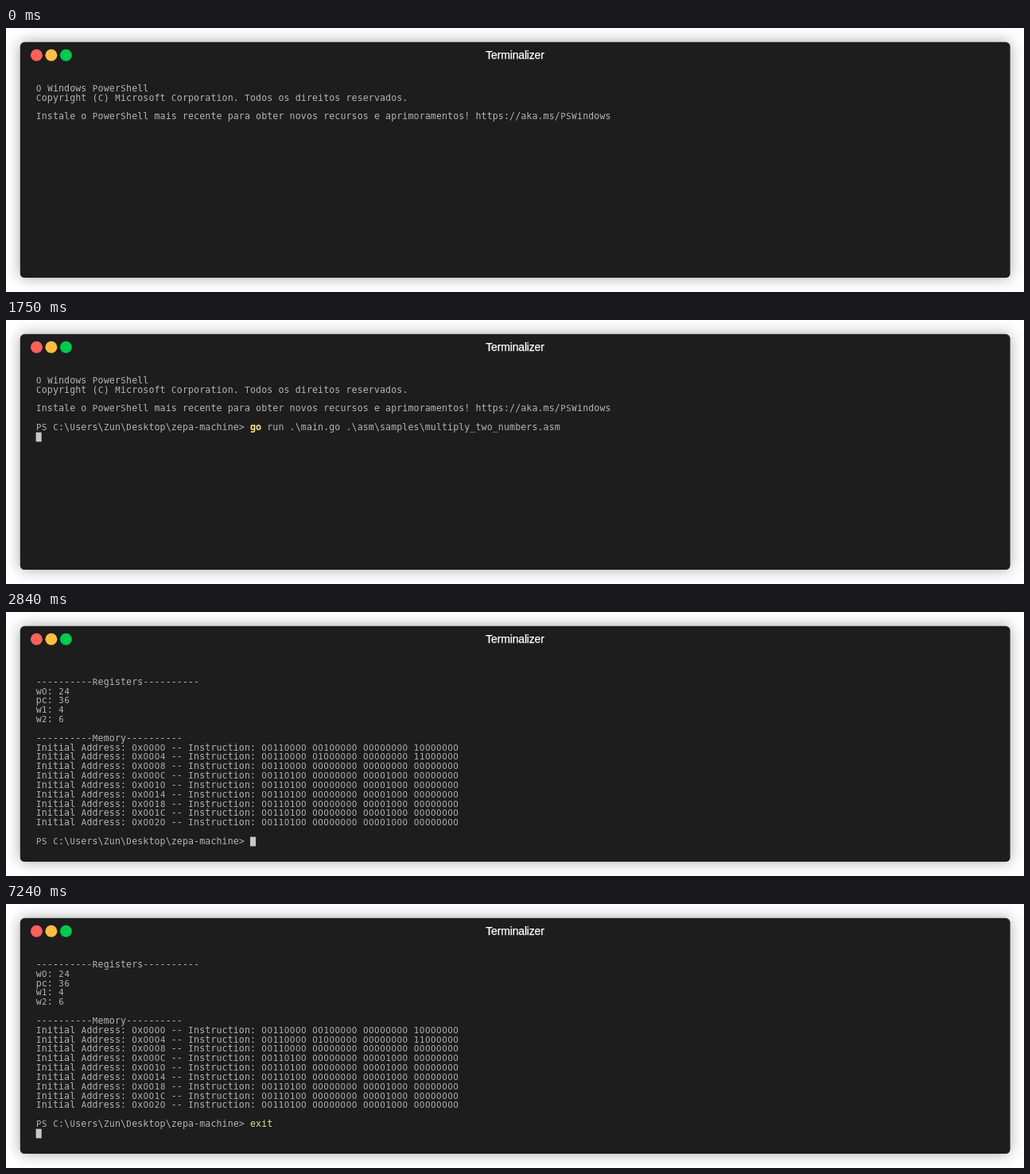
Recreate the animation shown at these times as an HTML page with a canvas. Size 1280x333 px, loop 7.98 s.

```html
<!DOCTYPE html>
<html lang="pt">
<head>
<meta charset="utf-8">
<title>Terminalizer</title>
<style>
  html, body { margin: 0; width: 100%; height: 100%; overflow: hidden; background: #fff; }
  svg, canvas { position: absolute; left: 0; top: 0; }
  .window { fill: #1d1d1d; filter: drop-shadow(0 0 9px rgba(0, 0, 0, .34)); }
  .title {
    font-family: "Liberation Sans", Arial, sans-serif; font-size: 14px; letter-spacing: -.17px;
    text-anchor: middle; fill: #fff; stroke: #fff; stroke-width: .25px;
  }
</style>
</head>
<body>
<svg width="1280" height="333">
  <rect class="window" x="17.8" y="17.8" width="1244.8" height="297.2" rx="5.5"/>
  <circle cx="38.4" cy="34.2" r="7.5" fill="#ff605c"/>
  <circle cx="56.9" cy="34.2" r="7.5" fill="#ffbd44"/>
  <circle cx="75.4" cy="34.2" r="7.5" fill="#00ca4e"/>
  <text class="title" x="640" y="39">Terminalizer</text>
</svg>
<canvas width="1280" height="333"></canvas>
<script>
const LOOP = 7980;
const CELL = { x: 37.6, y: 70.7, w: 7.088, h: 11.83 };
const TEXT = '#b4b4b4', CURSOR = '#c7c7c7', GOLD = '#f8e886', LIME = '#dde57f';
const PROMPT = 'PS C:\\Users\\Zun\\Desktop\\zepa-machine> ';
const RUN = PROMPT + 'go run .\\main.go .\\asm\\samples\\multiply_two_numbers.asm';
const RECORD = PROMPT + 'terminalizer record multiply_two_numbers';

const banner = [
  'O Windows PowerShell',
  'Copyright (C) Microsoft Corporation. Todos os direitos reservados.',
  '',
  'Instale o PowerShell mais recente para obter novos recursos e aprimoramentos! https://aka.ms/PSWindows',
  ''
];

const program = [
  '00110000 00100000 00000000 10000000',
  '00110000 01000000 00000000 11000000',
  '00110000 00000000 00000000 00000000',
  ...Array(6).fill('00110100 00000000 00001000 00000000')
];
const dashes = '-'.repeat(10);
const heading = name => dashes + name + dashes;
const address = i => '0x' + (i * 4).toString(16).toUpperCase().padStart(4, '0');
const report = [
  heading('Registers'), 'w0: 24', 'pc: 36', 'w1: 4', 'w2: 6', '',
  heading('Memory'),
  ...program.map((bits, i) => `Initial Address: ${address(i)} -- Instruction: ${bits}`)
];

// The cursor sits at the end of the last row.
const step = (at, rows, color = GOLD, bold = true) => ({ at, rows, color, bold });
const typed = (at, word) => step(at, ['', ...report, '', PROMPT + word], LIME);
const steps = [
  step(0, banner),
  step(150, [...banner, PROMPT]),
  step(700, [...banner, RECORD]),
  step(920, [...banner, RUN]),
  step(1750, [...banner, RUN, '']),
  step(2710, [RUN, '', ...report, ''], GOLD, false),
  step(2810, ['', ...report, '', '']),
  typed(2840, ''),
  typed(4840, 'e'),
  typed(4920, 'ex'),
  typed(5140, 'exi'),
  typed(5380, 'exit'),
  step(7240, [...report, '', PROMPT + 'exit', ''], LIME, false)
];

const ctx = document.querySelector('canvas').getContext('2d');
ctx.textAlign = 'center';

// Short capitals and an open zero.
function fontFor(char, bold) {
  if (bold) return '700 11.6px "Noto Sans Mono", monospace';
  if (char === '0') return '10.4px "DejaVu Sans", sans-serif';
  const size = /[A-Z1-9]/.test(char) ? 10.6 : 11.6;
  return `${size}px "DejaVu Sans Mono", monospace`;
}

function drawRow(text, row, { color, bold }) {
  const baseline = Math.round(CELL.y + row * CELL.h + 9.3);
  const isCommand = text.startsWith(PROMPT);
  const wordEnd = isCommand ? PROMPT.length + text.slice(PROMPT.length).split(' ')[0].length : 0;
  [...text].forEach((char, col) => {
    if (char === ' ') return;
    const inWord = isCommand && col >= PROMPT.length && col < wordEnd;
    ctx.font = fontFor(char, inWord && bold);
    ctx.fillStyle = inWord ? color : TEXT;
    ctx.fillText(char, CELL.x + (col + .5) * CELL.w, baseline);
  });
}

function draw(current) {
  const { rows } = current;
  ctx.clearRect(0, 0, 1280, 333);
  rows.forEach((text, row) => drawRow(text, row, current));
  if (current === steps[0]) return;
  const row = rows.length - 1;
  ctx.fillStyle = CURSOR;
  ctx.fillRect(CELL.x + rows[row].length * CELL.w, CELL.y + row * CELL.h, CELL.w, CELL.h);
}

const start = performance.now();
let shown;
function tick() {
  const time = (performance.now() - start) % LOOP;
  const current = steps.findLast(s => s.at <= time);
  if (current !== shown) draw(shown = current);
  requestAnimationFrame(tick);
}
tick();
</script>
</body>
</html>
```
